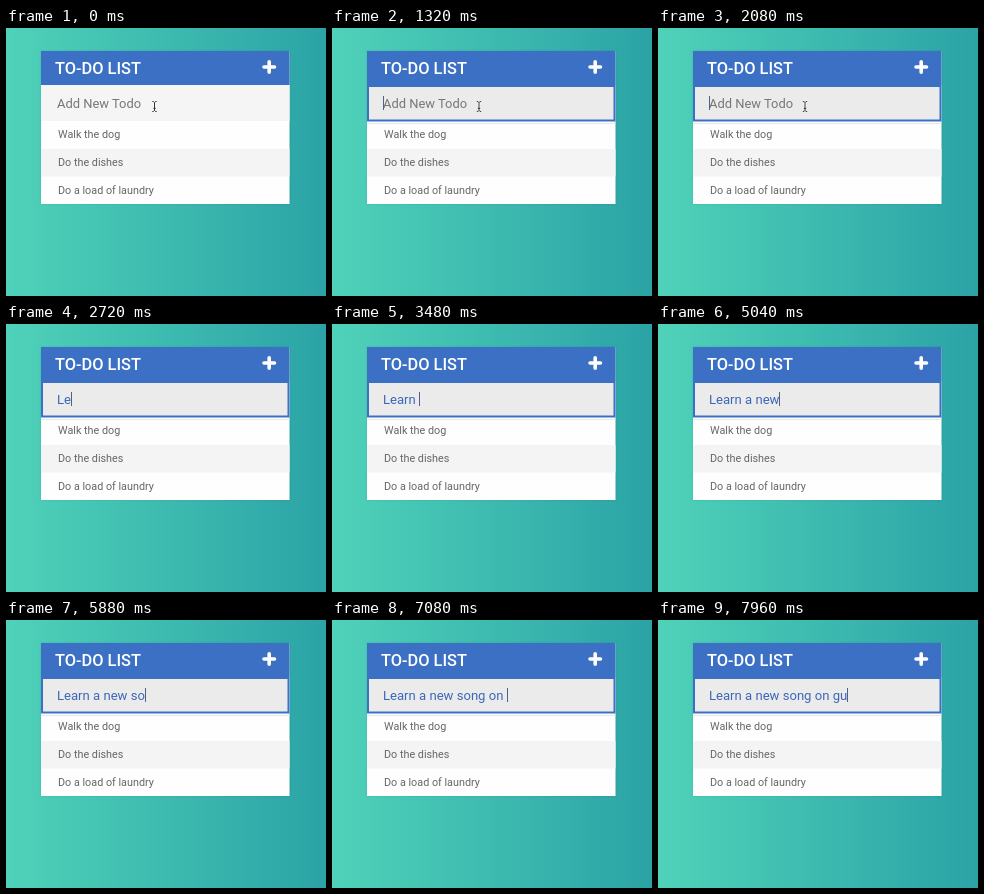
Animation of 320 by 268 pixels, one loop 8 s. Source, as an HTML page:

```html
<!DOCTYPE html>
<html lang="en">
<head>
<meta charset="utf-8">
<title>To-Do List</title>
<style>
  html, body { margin: 0; width: 100%; height: 100%; overflow: hidden; }
  svg { display: block; width: 320px; height: 268px; font-family: Roboto, sans-serif; }
  text { white-space: pre; }
  .title { font-size: 16.4px; font-weight: 500; fill: #fff; }
  .item { font-size: 10.8px; fill: #666; }
  .entry { font-size: 13.1px; }
  #hint { font-size: 12.95px; fill: #777; }
  #typed { fill: #3b67b9; }
</style>
</head>
<body>
<svg viewBox="0 0 320 268">
  <defs>
    <linearGradient id="sea">
      <stop offset="0" stop-color="#4fd2b9"/>
      <stop offset="1" stop-color="#2ba3a6"/>
    </linearGradient>
    <filter id="shadow" x="-5%" y="-5%" width="110%" height="110%">
      <feDropShadow dx="0" dy="0" stdDeviation="1" flood-opacity=".12"/>
    </filter>
  </defs>
  <rect width="320" height="268" fill="url(#sea)"/>
  <rect x="35" y="23" width="248.5" height="153" fill="#fefefe" filter="url(#shadow)"/>
  <rect x="35" y="23" width="248.5" height="34" fill="#3b70c5"/>
  <text class="title" x="49" y="45.5">TO-DO LIST</text>
  <path d="M258 39H268.5M263.2 33.8V44.2" stroke="#fff" stroke-width="3.6" stroke-linecap="round"/>

  <rect x="35" y="57" width="248.5" height="36" fill="#f5f5f5"/>
  <g id="focus">
    <rect x="36" y="58" width="246.5" height="34.5" fill="#ebebeb" stroke="#3b70c5" stroke-width="2"/>
    <path d="M35 95.5H283.5" stroke="#e4e6e8"/>
  </g>
  <text class="entry" id="hint" x="51" y="79.5">Add New Todo</text>
  <text class="entry" id="typed" x="51" y="79.5"></text>
  <rect id="caret" y="68" width="1" height="14" fill="#4c6288"/>

  <rect x="35" y="121" width="248.5" height="27.5" fill="#f4f4f4"/>
  <text class="item" x="52" y="110.3">Walk the dog</text>
  <text class="item" x="52" y="138">Do the dishes</text>
  <text class="item" x="52" y="165.6">Do a load of laundry</text>

  <g id="pointer" fill="none">
    <path id="beam" d="M-2.2-5Q-.3-5 0-4Q.3-5 2.2-5M0-4V4M-2.2 5Q-.3 5 0 4Q.3 5 2.2 5M-1.2 1.8H1.2" stroke="#fff" stroke-width="2.2"/>
    <path d="M-2.2-5Q-.3-5 0-4Q.3-5 2.2-5M0-4V4M-2.2 5Q-.3 5 0 4Q.3 5 2.2 5M-1.2 1.8H1.2" stroke="#333"/>
  </g>
</svg>
<script>
  const LOOP = 8000, FOCUS_AT = 920;
  const PHRASE = "Learn a new song on gu";
  const KEY_TIMES = [
    2440, 2640, 2880, 3080, 3280, 3480,
    3720, 3960,
    4440, 4680, 4900, 5120,
    5480, 5760, 5960, 6160, 6360,
    6600, 6800, 6960,
    7400, 7760
  ];
  const [focus, hint, typed, caret, pointer] =
    ["focus", "hint", "typed", "caret", "pointer"].map(id => document.getElementById(id));

  const show = (node, on) => node.setAttribute("visibility", on ? "visible" : "hidden");

  function render(t) {
    const count = KEY_TIMES.filter(at => at <= t).length;
    const focused = t >= FOCUS_AT;
    const lastInput = count ? KEY_TIMES[count - 1] : FOCUS_AT;
    const text = PHRASE.slice(0, count);

    if (typed.textContent !== text) typed.textContent = text;
    const width = count ? typed.getComputedTextLength() : 0;
    caret.setAttribute("x", Math.round(51 + width));

    show(focus, focused);
    show(hint, !count);
    show(caret, focused && (t - lastInput) % 1000 < 500);
    show(pointer, !count);

    const drift = Math.min(1, t / FOCUS_AT);
    pointer.setAttribute("transform", `translate(${148.5 - 1.5 * drift} 78.5)`);
  }

  function tick() {
    render(performance.now() % LOOP);
    requestAnimationFrame(tick);
  }
  tick();
</script>
</body>
</html>
```
